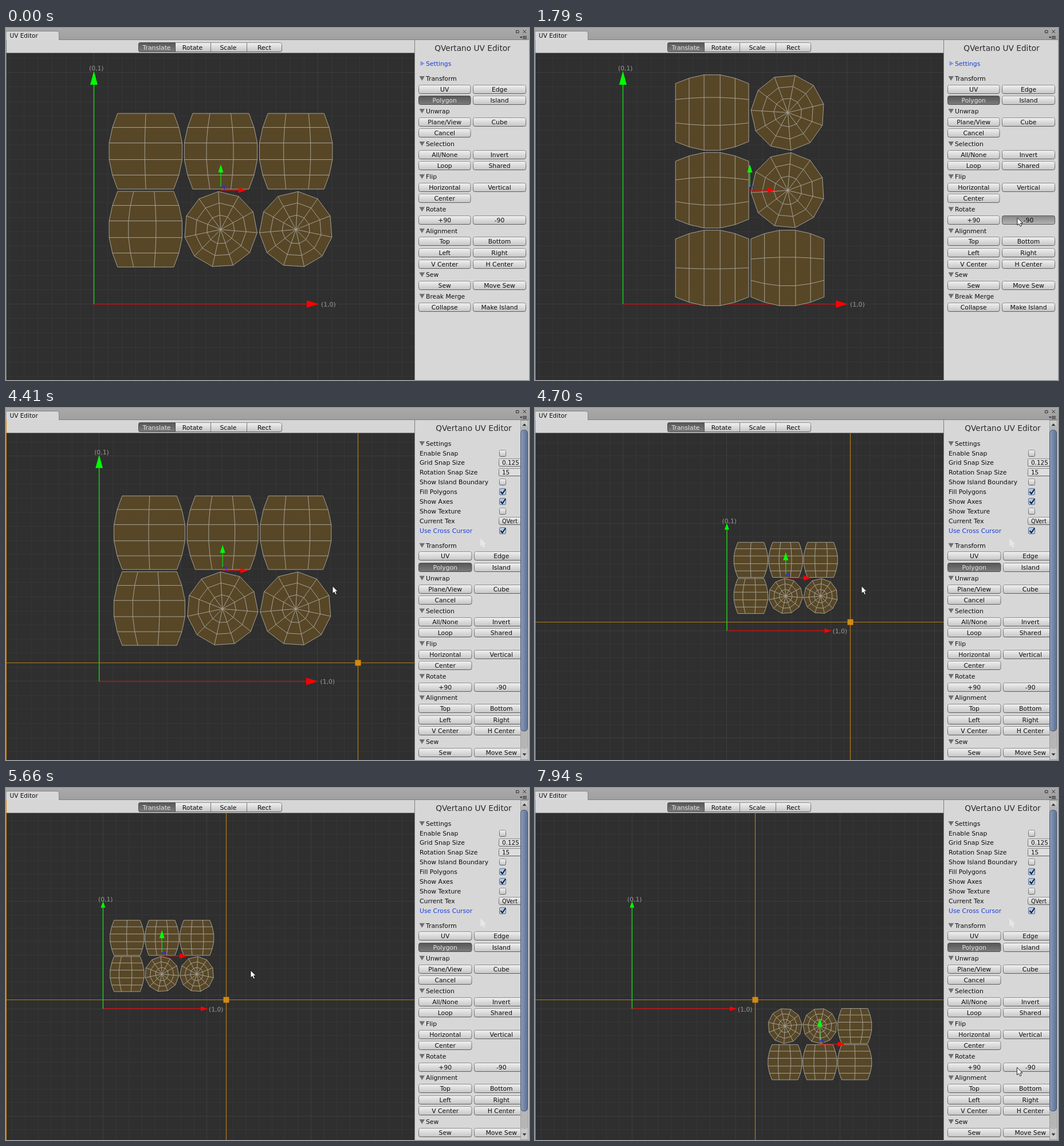
Animation of 913x614 px, one loop 7.99 s. Source, as an HTML page:

```html
<!DOCTYPE html>
<html lang="en">
<head>
<meta charset="utf-8">
<title>UV Editor</title>
<style>
html, body { margin: 0; width: 100%; height: 100%; overflow: hidden; background: #d6d6d6; }
svg { display: block; font: 10.8px "DejaVu Sans", Verdana, sans-serif; }
text { fill: #0c0c0c; }
.mid { text-anchor: middle; }
.btn { fill: url(#up); stroke: url(#edge); }
.btn.on { fill: url(#on); stroke: #4c4c4c; }
.btn.down { fill: url(#down); stroke: #585858; }
.light { fill: #e4e4e4; }
.blue { fill: #1b3fdc; }
.title { fill: #2a2a2a; font-size: 13.7px; }
.axis { fill: #9a9a9a; }
.mesh { fill: rgba(91, 74, 39, .93); stroke: #a6a196; stroke-width: 1; }
.mesh path { vector-effect: non-scaling-stroke; }
</style>
</head>
<body>
<svg id="stage" width="913" height="614" viewBox="0 0 913 614" xmlns="http://www.w3.org/2000/svg">
  <defs>
    <linearGradient id="up" x2="0" y2="1"><stop stop-color="#f1f1f1"/><stop offset="1" stop-color="#c5c5c5"/></linearGradient>
    <linearGradient id="edge" x2="0" y2="1"><stop stop-color="#8e8e8e"/><stop offset="1" stop-color="#5e5e5e"/></linearGradient>
    <linearGradient id="on" x2="0" y2="1"><stop stop-color="#565656"/><stop offset="1" stop-color="#7c7c7c"/></linearGradient>
    <linearGradient id="down" x2="0" y2="1"><stop stop-color="#858585"/><stop offset="1" stop-color="#b4b4b4"/></linearGradient>
    <linearGradient id="bar" x2="0" y2="1"><stop stop-color="#a9a9a9"/><stop offset="1" stop-color="#9f9f9f"/></linearGradient>
    <linearGradient id="thumb"><stop stop-color="#8b9cba"/><stop offset="1" stop-color="#5d7094"/></linearGradient>
    <clipPath id="viewClip"><rect x="1" y="44" width="712" height="570"/></clipPath>
    <clipPath id="listClip"><rect x="715" y="21" width="183" height="593"/></clipPath>
    <path id="arrow" d="M0 0V13L3 10.4L5.2 15L7.5 14L5.4 9.5H9.3Z"/>
  </defs>
</svg>
<script>
const LOOP = 7990, K = 1.033, UNIT = 391;
const ORIGIN = [153.5, 481.5], ZOOM_AT = [492, 308];
const CENTER = [221.5, -198.5], CROSS = [464, -32.7];

const stage = document.getElementById('stage');

function add(parent, tag, attrs = {}, text) {
  const el = document.createElementNS('http://www.w3.org/2000/svg', tag);
  set(el, attrs);
  if (text) el.textContent = text;
  parent.append(el);
  return el;
}
function set(el, attrs) {
  for (const key in attrs) el.setAttribute(key, attrs[key]);
}
const box = (g, x, y, width, height, more) => add(g, 'rect', { x, y, width, height, ...more });
const label = (g, x, y, text, cls = '', more) => add(g, 'text', { x, y: y + 4, class: cls, ...more }, text);
const path = (g, d, more) => add(g, 'path', { d, ...more });
const poly = pts => 'M' + pts.map(p => p.map(n => +n.toFixed(2)).join(' ')).join('L');
const show = (el, on) => el.setAttribute('visibility', on ? 'visible' : 'hidden');

// ---------- viewport ----------
const view = add(stage, 'g', { 'clip-path': 'url(#viewClip)' });
box(view, 0, 43, 714, 571, { fill: '#2f2f2f' });
const grid = path(view, '', { stroke: '#363636', fill: 'none' });
const gridMain = path(view, '', { stroke: '#3d3d3d', fill: 'none' });
const axisX = path(view, '', { stroke: '#cc1010', 'stroke-width': 1.5 });
const axisY = path(view, '', { stroke: '#1fcc1f', 'stroke-width': 1.5 });
const headX = path(view, '', { fill: '#f00' });
const headY = path(view, '', { fill: '#0f0' });
const labelX = label(view, 0, 0, '(1,0)', 'axis');
const labelY = label(view, 0, 0, '(0,1)', 'axis mid');
const mesh = add(view, 'g', { class: 'mesh' });

const ROWS = [-66, -41.5, -14.5, 14.5, 41.5, 66];
const HALF = [49, 58, 63.7, 63.7, 58, 49];

function island(outline, lines) {
  path(mesh, poly(outline) + 'Z');
  path(mesh, lines, { fill: 'none' });
}

// Each seam is [x at the rim, x at the belly].
function barrel(cx, cy, seams) {
  const side = sign => ROWS.map((y, i) => [cx + sign * HALF[i], cy + y]);
  let lines = '';
  for (let i = 1; i < 5; i++) lines += poly([side(-1)[i], side(1)[i]]);
  for (const [rim, belly] of seams)
    lines += poly(ROWS.map((y, i) => [cx + rim + (belly - rim) * (HALF[i] - 49) / 14.7, cy + y]));
  island([...side(1), ...side(-1).reverse()], lines);
}

function disc(cx, cy, start) {
  const ring = f => Array.from({ length: 11 }, (_, i) => {
    const a = (start + i * 360 / 11) * Math.PI / 180;
    return [cx + 64 * f * Math.cos(a), cy + 66.3 * f * Math.sin(a)];
  });
  const rings = [.7, .38].map(f => poly(ring(f)) + 'Z');
  const spokes = ring(1).map(p => poly([[cx, cy], p]));
  island(ring(1), [...rings, ...spokes].join(''));
}

barrel(-131.2, -68, [[.3, -1.5]]);
barrel(0, -68, [[-19, -25], [17.5, 22]]);
barrel(131.2, -68, [[-17.5, -21.5], [22, 25.5]]);
barrel(-131.2, 68, [[-21, -30], [15, 18]]);
disc(-.3, 68.5, -93.4);
disc(131.2, 68.5, -86.6);

const gizmo = add(view, 'g');
path(gizmo, 'M0-6V-32', { stroke: '#1fd01f', 'stroke-width': 1.4 });
path(gizmo, 'M0 0H32', { stroke: '#cc1414', 'stroke-width': 1.4 });
path(gizmo, 'M0-6H6.5V0', { stroke: '#2a2af0', 'stroke-width': 1.4, fill: 'none' });
path(gizmo, 'M0-45L4.5-31H-4.5Z', { fill: '#0f0' });
path(gizmo, 'M44.5 0L31-4.5V4.5Z', { fill: '#f00' });

const cross = add(view, 'g');
path(cross, 'M-999 0H999M0-999V999', { stroke: '#b67c16', 'stroke-width': 1.2 });
box(cross, -5, -5, 10, 10, { fill: '#d18b14' });

// ---------- window frame ----------
box(stage, 0, 0, 913, 21, { fill: 'url(#bar)' });
path(stage, 'M0 21V5.5H89Q92.5 5.5 92.5 9V21', { fill: '#d8d8d8', stroke: '#868686' });
label(stage, 6.5, 13, 'UV Editor', '', { 'font-size': 10.5 });
box(stage, 0, 21, 714, 22, { fill: '#d6d6d6' });
path(stage, 'M92 20.5H913M0 43.5H714M713.5 21V614M.5 21V614', { stroke: '#7e7e7e' });
path(stage, 'M890.5 4.5H895V8.5H890.5ZM902.5 3.5L908 9M908 3.5L902.5 9M902 14.5H909M902 16.5H909M902 18.5H909',
  { stroke: '#2e2e2e', fill: 'none' });
path(stage, 'M897 15H901.5L899.2 18Z', { fill: '#2e2e2e' });

box(stage, 231.5, 25.5, 250, 16, { rx: 3, class: 'btn' });
path(stage, 'M295.5 41.5H234.5Q231.5 41.5 231.5 38.5V28.5Q231.5 25.5 234.5 25.5H295.5Z', { class: 'btn on' });
path(stage, 'M357.5 26V41M420.5 26V41', { stroke: '#747474' });
['Translate', 'Rotate', 'Scale', 'Rect'].forEach((name, i) =>
  label(stage, [263, 325.5, 388, 451][i], 34, name, i ? 'mid' : 'mid light'));

// ---------- side panel ----------
box(stage, 714.5, 21, 199, 593, { fill: '#d7d7d7' });

const SECTIONS = [
  ['Transform', 'UV', 'Edge', 'Polygon', 'Island'],
  ['Unwrap', 'Plane/View', 'Cube', 'Cancel'],
  ['Selection', 'All/None', 'Invert', 'Loop', 'Shared'],
  ['Flip', 'Horizontal', 'Vertical', 'Center'],
  ['Rotate', '+90', '-90'],
  ['Alignment', 'Top', 'Bottom', 'Left', 'Right', 'V Center', 'H Center'],
  ['Sew', 'Sew', 'Move Sew'],
  ['Break Merge', 'Collapse', 'Make Island']
];
const turnButtons = { '+90': [], '-90': [] };

function header(g, y, name) {
  path(g, `M721.5 ${y - 4}H731L726.2 ${y + 4}Z`, { fill: '#6f6f6f' });
  label(g, 733, y, name);
}

function panel(titleX, top, width, x2, width2) {
  const g = add(stage, 'g', { 'clip-path': top > 100 ? 'url(#listClip)' : 'none' });
  label(g, titleX, 36, 'QVertano UV Editor', 'mid title');
  let y = top;
  for (const [name, ...buttons] of SECTIONS) {
    header(g, y, name);
    y += 18.75;
    buttons.forEach((text, i) => {
      const [x, w] = i % 2 ? [x2, width2] : [720.5, width];
      const on = text === 'Polygon';
      const by = y + (i >> 1) * 19.55;
      const b = box(g, x, Math.round(by) - 7.5, w, 15, { rx: 3, class: on ? 'btn on' : 'btn' });
      label(g, x + w / 2, by, text, on ? 'mid light' : 'mid');
      if (turnButtons[text]) turnButtons[text].push(b);
    });
    y += (Math.ceil(buttons.length / 2) - 1) * 19.55 + 18.75;
  }
  return g;
}

const closed = panel(814.5, 88, 90.5, 815.5, 92);
path(closed, 'M723.5 57.5L731 62L723.5 66Z', { fill: '#8297df' });
label(closed, 733, 62, 'Settings', 'blue');

const open = panel(816.5, 239.7, 92.5, 817.5, 94.5);
header(open, 62, 'Settings');
let crossLabel, crossTick;
['Enable Snap', 'Grid Snap Size', 'Rotation Snap Size', 'Show Island Boundary', 'Fill Polygons',
  'Show Axes', 'Show Texture', 'Current Tex', 'Use Cross Cursor'].forEach((name, i) => {
  const y = 78.6 + i * 16.87, top = Math.round(y);
  const text = label(open, 722, y, name);
  const value = { 1: '0.125', 2: '15', 7: 'QVert' }[i];
  if (value) {
    const menu = i === 7;
    box(open, 860.5, top - 6.5, 60, 13, { rx: menu ? 3 : 1, class: 'btn', ...(menu ? {} : { style: 'fill:#dedede' }) });
    label(open, 866, y, value, '', { 'font-size': menu ? 9.6 : 10.4 });
    return;
  }
  box(open, 861.5, top - 5.5, 11, 11, { rx: 2, class: 'btn' });
  if (i === 4 || i === 5 || i === 8) {
    const tick = add(open, 'g');
    box(tick, 861.5, top - 5.5, 11, 11, { rx: 2, fill: '#b4c8e2', stroke: '#56709a' });
    path(tick, `M863.5 ${top}L866.5 ${top + 3.5}L872 ${top - 4.5}`, { stroke: '#141e30', 'stroke-width': 2, fill: 'none' });
    if (i === 8) { crossLabel = text; crossTick = tick; }
  }
});

const scroll = add(stage, 'g');
box(scroll, 898.5, 21.5, 13, 592, { fill: '#c9c9c9', stroke: '#9d9d9d' });
box(scroll, 899, 30, 12, 565, { fill: '#b5b5b5', rx: 5 });
box(scroll, 898.5, 38.5, 12, 525, { rx: 5, fill: 'url(#thumb)', stroke: '#485873' });
path(scroll, 'M901.5 31H908.5L905 27ZM901.5 602.5H908.5L905 606.5Z', { fill: '#333' });

const focus = box(stage, 0, 21, 1, 593, { fill: '#d58a1c' });
const ghost = add(stage, 'use', { href: '#arrow', x: 828.5, y: 228, fill: '#f2f2f2', opacity: .6, stroke: '#fff', 'stroke-width': .8, 'stroke-dasharray': '1.5 1.5' });
const cursor = add(stage, 'use', { href: '#arrow', fill: '#fff', stroke: '#111', 'stroke-width': .9 });

// ---------- timeline ----------
const MOVES = [
  [50, 888, 300], [450, 778, 331], [1210, 778, 331], [1450, 842, 331], [2070, 842, 331],
  [2450, 812, 110], [2650, 796, 4], [2830, 790, 24], [2960, 724.5, 65.5], [3180, 724.5, 65.5],
  [3600, 866, 209], [3710, 866, 209], [3780, 829, 228], [4260, 570, 310.5]
];
const PAN = [[4790, 0, 0], [5110, -91, -11.5], [5250, -130, -8], [5380, -130, -8], [5520, -165.5, -3.5]];
const LATE = [[5620, 404.5, 307], [6300, 778, 489], [7310, 778, 489], [7780, 841.5, 487.5]];
const ZOOM = [[0, 1], [4410, .973], [4460, .85], [4510, .72], [4660, .59], [4700, .464]];
const TURNS = [[0, 0], [630, 1], [980, 2], [1570, 1], [1880, 0], [6440, 1], [6770, 2], [7080, 3], [7940, 2]];
const PRESS = {
  '+90': [540, 890, 6350, 6680, 6980],
  '-90': [1480, 1790, 7850]
};
const MATRIX = [[1, 0, 0, 1], [0, -K, 1 / K, 0], [-1, 0, 0, -1], [0, K, -1 / K, 0]];

const held = (keys, t) => keys.reduce((last, k) => t >= k[0] ? k : last);

function track(keys, t) {
  if (t <= keys[0][0]) return keys[0].slice(1);
  const i = keys.findIndex(k => k[0] > t);
  if (i < 0) return keys[keys.length - 1].slice(1);
  const a = keys[i - 1], b = keys[i], f = (t - a[0]) / (b[0] - a[0]);
  return [a[1] + (b[1] - a[1]) * f, a[2] + (b[2] - a[2]) * f];
}

function turn([x, y], q) {
  const [a, b, c, d] = MATRIX[q];
  return [a * x + c * y, b * x + d * y];
}

const snap = n => Math.floor(n) + .5;

function gridPath(ox, oy, step) {
  let d = '';
  for (let x = ox % step; x < 714; x += step) d += `M${snap(x)} 43V614`;
  for (let y = oy % (step * K); y < 614; y += step * K) d += `M0 ${snap(y)}H714`;
  return d;
}

let lastView = '';
function drawView(s, x, y) {
  const key = [s, x, y].join();
  if (key === lastView) return;
  lastView = key;
  const right = x + UNIT * s, top = y - UNIT * K * s;
  set(grid, { d: gridPath(x, y, UNIT * s / (s > .6 ? 16 : 8)) });
  set(gridMain, { d: gridPath(x, y, UNIT * s) });
  const tipX = right + 1.5, tipY = top + 2 - 4.5 * s, w = 1.8 + 4.7 * s;
  const baseX = tipX - 5 - 16 * s, baseY = tipY + 24 * s;
  set(axisX, { d: `M${x} ${y}H${baseX}` });
  set(axisY, { d: `M${x} ${y}V${baseY}` });
  set(headX, { d: poly([[tipX, y], [baseX, y - w], [baseX, y + w]]) });
  set(headY, { d: poly([[x, tipY], [x - w, baseY], [x + w, baseY]]) });
  set(labelX, { x: right + 1 + 4.5 * s, y: y + 4.5 });
  set(labelY, { x: x + 4.3, y: top + 3.5 - 7 * s });
}

function draw(t) {
  const s = held(ZOOM, t)[1], [turnedAt, q] = held(TURNS, t), pan = track(PAN, t);
  const [ox, oy] = ORIGIN.map((o, i) => ZOOM_AT[i] + (o - ZOOM_AT[i]) * s + pan[i]);
  drawView(s, ox, oy);

  // Once the cross is shown, it becomes the pivot.
  const crossOn = t >= 3710;
  let c = CENTER;
  if (crossOn) {
    const r = turn([c[0] - CROSS[0], c[1] - CROSS[1]], q);
    c = [CROSS[0] + r[0], CROSS[1] + r[1]];
  }
  const cx = ox + c[0] * s, cy = oy + c[1] * s;
  set(mesh, { transform: `matrix(${MATRIX[q].map(n => n * s)} ${cx} ${cy})` });
  set(gizmo, { transform: `translate(${cx} ${cy})` });
  set(cross, { transform: `translate(${snap(ox + CROSS[0] * s)} ${snap(oy + CROSS[1] * s)})` });

  const expanded = t >= 3100;
  show(closed, !expanded);
  show(open, expanded);
  show(scroll, expanded);
  show(cross, crossOn);
  show(crossTick, expanded && crossOn);
  set(crossLabel, { class: crossOn ? 'blue' : '' });
  show(ghost, t >= 3800);
  show(focus, t >= 50);
  show(cursor, t >= 50);

  // A button stays down until its turn happens.
  for (const name in PRESS) {
    const down = PRESS[name].some(p => p <= t && p > turnedAt);
    for (const b of turnButtons[name]) b.classList.toggle('down', down);
  }

  let [x, y] = track(t < 5570 ? MOVES : LATE, t);
  if (t < 5570) { x += pan[0]; y += pan[1]; }
  set(cursor, { x, y });
}

const begin = performance.now();
function tick() {
  draw((performance.now() - begin) % LOOP);
  requestAnimationFrame(tick);
}
tick();
</script>
</body>
</html>
```
